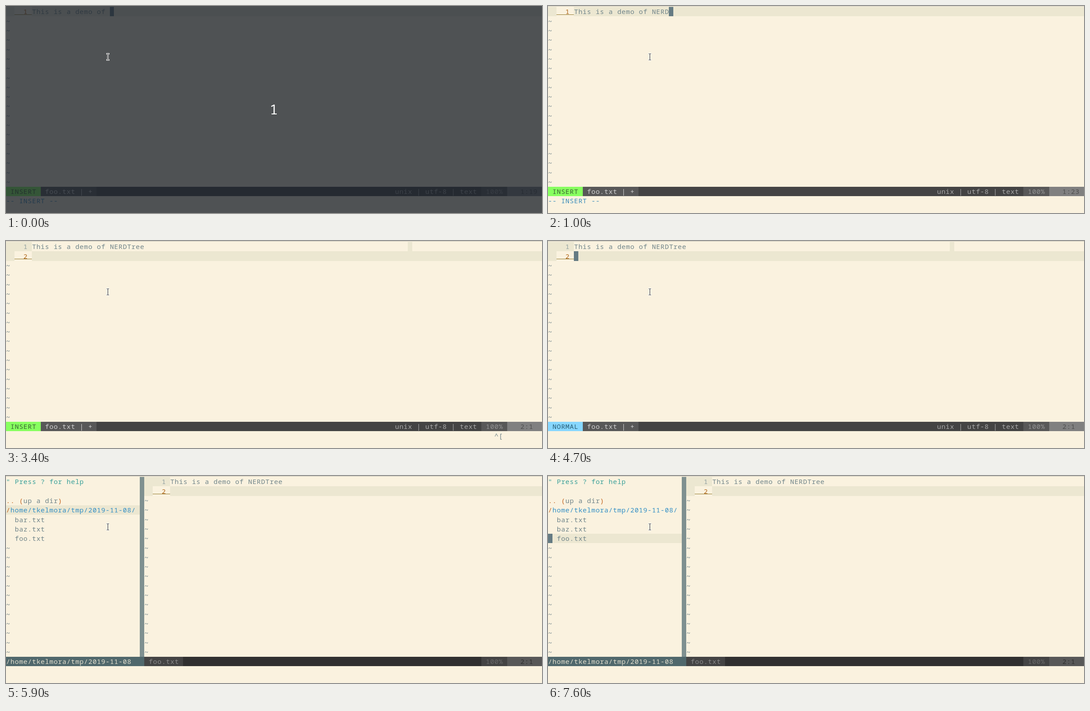
These frames come from a looping animation (1202x466 px, 8 s). An HTML page with a canvas:

```html
<!DOCTYPE html>
<html lang="en">
<head>
<meta charset="utf-8">
<title>Editor file tree demo</title>
<style>
html, body { margin: 0; width: 100%; height: 100%; overflow: hidden; background: #faf2df; }
canvas { display: block; }
</style>
</head>
<body>
<canvas id="stage" width="1202" height="466"></canvas>
<script>
const ctx = document.getElementById('stage').getContext('2d');
const LOOP = 8000, CELL = 9.69, LINE = 21.3, TOP = 2, COLS = 125, STATUS = 19;
const FONT = '"Noto Sans Mono", "DejaVu Sans Mono", monospace';
const BG = '#faf2df', SHADE = '#ece7d1', TEXT = '#71858a', CURSOR = '#657b83';
const BLUE = '#338fc6', ORANGE = '#c4651f', TEAL = '#3aa09a';
const DIR = '/home/tkelmora/tmp/2019-11-08';
const SENTENCE = 'This is a demo of ', TYPED = 'NERDTree';
const KEY_TIMES = [200, 300, 600, 1000, 1200, 1600, 1900, 1900];

const colX = col => Math.round(col * CELL);
const rowY = row => Math.round(TOP + row * LINE);

function fill(row, from, to, color, rows = 1) {
  ctx.fillStyle = color;
  ctx.fillRect(colX(from), rowY(row), colX(to) - colX(from), rowY(row + rows) - rowY(row));
}

// Terminal text: one glyph per cell
function print(row, col, text, color, weight = '') {
  ctx.font = `${weight} 15px ${FONT}`;
  ctx.textAlign = 'center';
  ctx.fillStyle = color;
  const y = Math.round(TOP + row * LINE + 16.4);
  [...text].forEach((ch, i) => ctx.fillText(ch, (col + i + 0.5) * CELL, y));
}

function cursor(row, col, under = '') {
  fill(row, col, col + 1, CURSOR);
  print(row, col, under, BG);
}

function tildes(first, col) {
  for (let row = first; row < STATUS; row++) print(row, col, '~', TEXT);
}

function lineNumber(row, col, active) {
  fill(row, col, col + 6, SHADE);
  if (active) {
    fill(row, col + 2, col + 6, BG);
    ctx.fillStyle = '#8f7628';
    ctx.fillRect(colX(col + 2), rowY(row) + 17, colX(col + 6) - colX(col + 2), 1);
  }
  print(row, col + 4, String(row + 1), active ? '#b0661a' : '#93a1a1', active ? 500 : '');
}

function buffer(col, text, activeRow) {
  if (activeRow && !col) fill(0, 93, 94, SHADE);
  fill(activeRow, col, COLS, SHADE);
  for (let row = 0; row <= activeRow; row++) lineNumber(row, col, row === activeRow);
  print(0, col + 6, text, TEXT);
  tildes(activeRow + 1, col);
}

function section(from, to, bg, col, text, color) {
  fill(STATUS, from, to, bg);
  print(STATUS, col, text, color);
}

function editor(t) {
  const typed = TYPED.slice(0, KEY_TIMES.filter(k => k <= t).length);
  const newline = t >= 2700, insert = t < 3500;
  const text = SENTENCE + typed;

  buffer(0, text, newline ? 1 : 0);
  if (!newline) cursor(0, 6 + text.length);
  else if (t < 3400 || (t >= 3500 && t < 4100) || t >= 4700) cursor(1, 6);

  section(0, 8, insert ? '#87ff5f' : '#87d7ff', 1, insert ? 'INSERT' : 'NORMAL', insert ? '#3b6434' : '#2b6077');
  section(8, 21, '#585858', 9, 'foo.txt | +', '#d0d0d0');
  section(21, 110, '#444444', 90, 'unix | utf-8 | text', '#a8a8a8');
  section(110, 116, '#585858', 111, '100%', '#949494');
  section(116, COLS, '#808080', 119, t < 2800 ? `1:${text.length + 1}` : '2:1', '#4e4e4e');

  if (t < 3400) print(20, 0, '-- INSERT --', '#3c8dbb');
  else if (insert) print(20, 113, '^[', TEXT);
}

function tree(t) {
  const loaded = t >= 5500;
  const row = !loaded ? 0 : t < 7200 ? 3 : t < 7400 ? 4 : t < 7600 ? 5 : 6;
  fill(row, 0, 31, SHADE);
  if (loaded) {
    print(0, 0, '" Press ? for help', TEAL);
    print(2, 0, '.. (        )', ORANGE);
    print(2, 4, 'up a dir', TEXT);
    print(3, 0, '/', ORANGE);
    print(3, 1, DIR.slice(1) + '/', BLUE);
    ['bar.txt', 'baz.txt', 'foo.txt'].forEach((name, i) => print(4 + i, 2, name, TEXT));
    if (t < 5900 || t >= 6500) cursor(row, 0, row === 3 ? '/' : '');
  }
  tildes(loaded ? 7 : 1, 0);
}

function splitView(t) {
  tree(t);
  buffer(32, SENTENCE + TYPED, 1);
  fill(0, 31, 32, '#7f9090', STATUS);
  section(0, 32, '#50686c', 0, DIR, '#e3dfce');
  section(32, 41, '#444444', 33, 'foo.txt', '#8a8a8a');
  section(41, 110, '#303030', 0, '', BG);
  section(110, 116, '#444444', 111, '100%', '#6a6a6a');
  section(116, COLS, '#585858', 119, '2:1', '#303030');
}

function countdown() {
  ctx.fillStyle = 'rgba(28, 34, 43, 0.77)';
  ctx.fillRect(0, 0, 1202, 466);
  ctx.font = `30px ${FONT}`;
  ctx.textAlign = 'center';
  ctx.fillStyle = '#fff';
  ctx.fillText('1', 600.5, 244);
}

function pointer() {
  const beam = (color, grow) => {
    ctx.fillStyle = color;
    for (const [x, y, w, h] of [[226, 107, 2, 1], [229, 107, 2, 1], [228, 108, 1, 13], [226, 121, 2, 1], [229, 121, 2, 1]])
      ctx.fillRect(x - grow, y - grow, w + 2 * grow, h + 2 * grow);
  };
  beam('#fff', 1);
  beam('#111', 0);
}

function draw(now) {
  const t = now % LOOP;
  ctx.fillStyle = BG;
  ctx.fillRect(0, 0, 1202, 466);
  ctx.fillStyle = '#c9c5b7';
  ctx.fillRect(0, 0, 1202, 1);
  (t < 5300 ? editor : splitView)(t);
  if (t < 100) countdown();
  pointer();
}

const start = performance.now();
function tick() {
  draw(performance.now() - start);
  requestAnimationFrame(tick);
}
tick();
</script>
</body>
</html>
```
